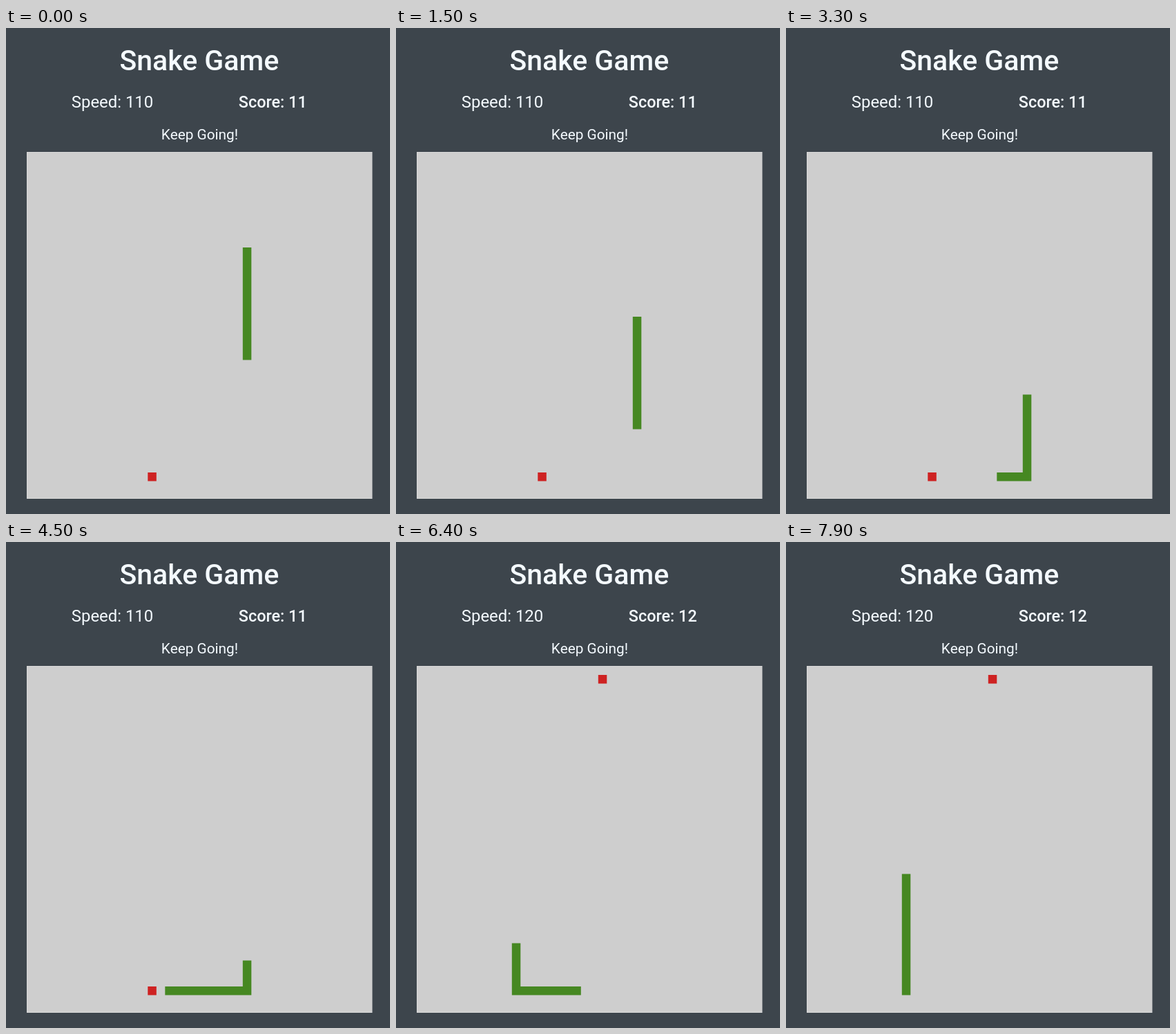
These frames come from a looping animation (556x702 px, 8000 ms). An HTML page:

```html
<!DOCTYPE html>
<html lang="en">
<head>
<meta charset="utf-8">
<title>Snake Game</title>
<style>
  html, body { margin: 0; width: 100%; height: 100%; overflow: hidden; background: #3d454c; }
  svg { display: block; width: 100%; height: 100%; }
  text { font-family: Roboto, "Open Sans", sans-serif; fill: #f4faff; }
  .strong { font-weight: 500; }
</style>
</head>
<body>
<svg viewBox="0 0 556 702">
  <rect width="556" height="702" fill="#3d454c"/>
  <text class="strong" x="279.8" y="60.5" font-size="41" text-anchor="middle">Snake Game</text>
  <text id="speed" x="94.8" y="115" font-size="23.9"></text>
  <text id="score" class="strong" x="336.8" y="115" font-size="23.4"></text>
  <text x="280.5" y="161" font-size="20.8" text-anchor="middle">Keep Going!</text>
  <rect x="30.5" y="179.5" width="499.4" height="500" fill="#cecece" stroke="#d8d8d8"/>
  <g transform="translate(30.3 179.5)">
    <rect id="food" width="12.5" height="12.5" fill="#ce2222"/>
    <polyline id="snake" fill="none" stroke="#468822" stroke-width="12.5" stroke-linecap="square"/>
  </g>
</svg>
<script>
const LOOP = 8000, FRAME = 100, CELL = 12.5;
const EAT = 25;        // step on which the head reaches the food
const GROW = EAT + 13; // the new segment shows once the tail has passed that cell
const LAST = 41;
const SLOW = 195, FAST = 186.5, EAT_TIME = 4775;

const $ = id => document.getElementById(id);
const speed = $('speed'), score = $('score'), food = $('food'), snake = $('snake');

// Head cell at a step: down, then left, then up
function headAt(step) {
  if (step <= 14) return [25, 23 + step];
  if (step <= 28) return [39 - step, 37];
  return [11, 65 - step];
}

function stepAt(ms) {
  const t = Math.floor(ms / FRAME) * FRAME - EAT_TIME;
  return Math.min(LAST, EAT + Math.floor(t / (t < 0 ? SLOW : FAST)));
}

function render(ms) {
  const step = stepAt(ms);
  const eaten = step >= EAT ? 1 : 0;
  const length = step >= GROW ? 14 : 13;
  const points = Array.from({ length }, (_, i) =>
    headAt(step - i).map(n => (n + 0.5) * CELL).join());
  snake.setAttribute('points', points.join(' '));

  const [col, row] = eaten ? [21, 1] : [14, 37];
  food.setAttribute('x', col * CELL);
  food.setAttribute('y', row * CELL);
  speed.textContent = 'Speed: ' + (110 + 10 * eaten);
  score.textContent = 'Score: ' + (11 + eaten);
}

const start = performance.now();
function tick() {
  render((performance.now() - start) % LOOP);
  requestAnimationFrame(tick);
}
tick();
</script>
</body>
</html>
```
